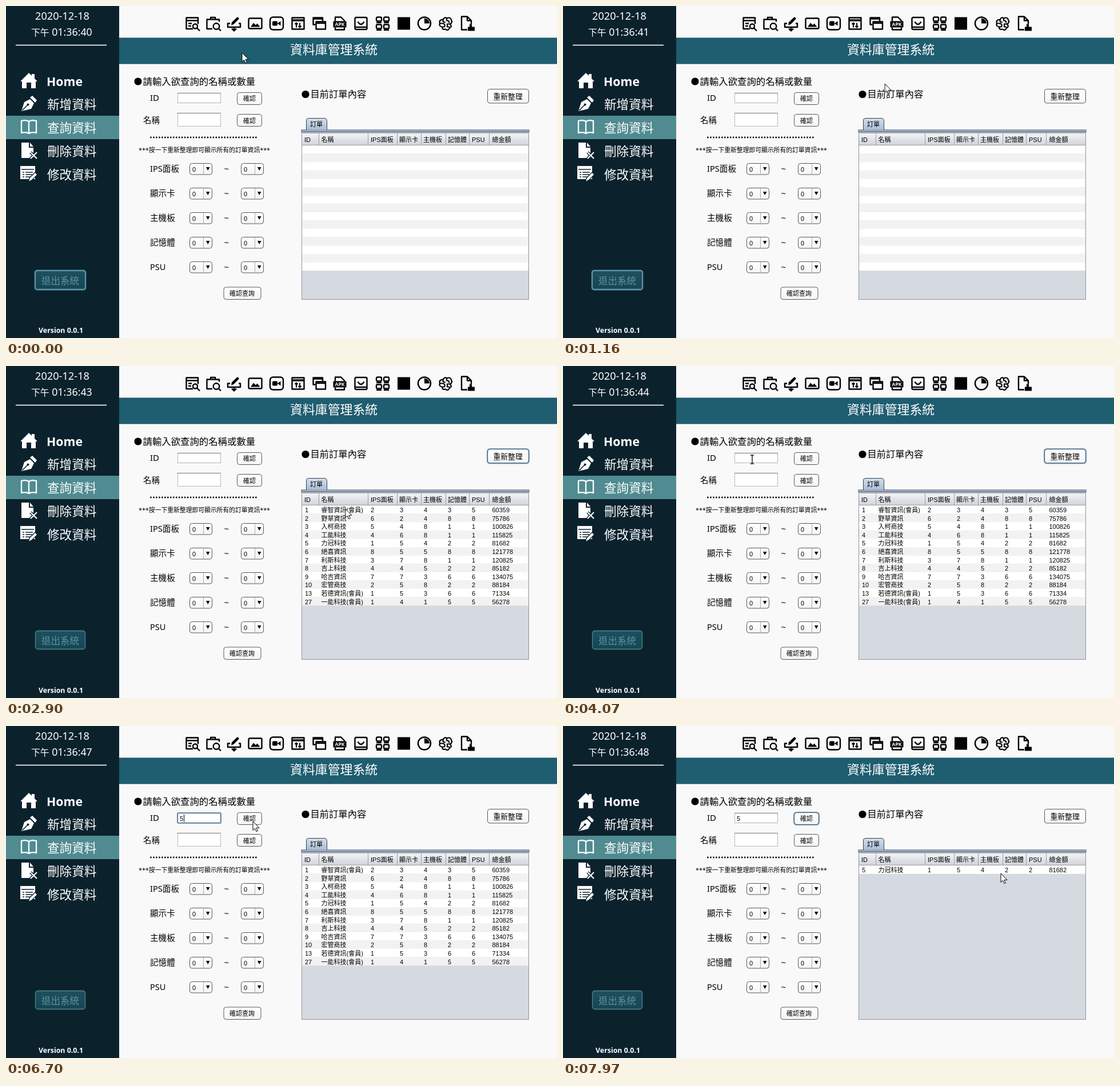
Write an HTML page that moves like this. It is 964 px wide and 581 px high and loops after 8 s.

```html
<!DOCTYPE html>
<html lang="zh-Hant">
<head>
<meta charset="utf-8">
<title>資料庫管理系統</title>
<style>
html, body { margin: 0; width: 100%; height: 100%; overflow: hidden; background: #f9f9f9; }
svg { display: block; width: 964px; height: 581px; }
text { font-family: "Noto Sans", "Noto Sans CJK TC", "Noto Sans CJK JP", sans-serif; font-weight: 500; white-space: pre; }
.ui text { font: 500 11px "Liberation Sans", "Noto Sans CJK TC", "Noto Sans CJK JP", sans-serif; }
.clock text { font-weight: 400; }
text.bold { font-weight: 700; }
.icon { fill: none; stroke: #000; stroke-width: 2.4; stroke-linejoin: round; }
.icon .solid { fill: #000; stroke: none; }
.digits { animation: tick 8s step-end infinite; }
.pointer { animation: move 8s linear infinite; }
.caret { animation: blink 1s step-end infinite; }
@keyframes blink { 0% { opacity: 0 } 50% { opacity: 1 } }
@keyframes tick {
  0% { transform: translateY(0) }
  5% { transform: translateY(-30px) }
  17.5% { transform: translateY(-60px) }
  30% { transform: translateY(-90px) }
  42.5% { transform: translateY(-120px) }
  55% { transform: translateY(-150px) }
  67.5% { transform: translateY(-180px) }
  80% { transform: translateY(-210px) }
  92.5% { transform: translateY(-240px) }
}
@keyframes move {
  0% { transform: translate(413px, 82px) }
  7.5% { transform: translate(413px, 82px); animation-timing-function: ease-in }
  14.5% { transform: translate(562px, 136px); animation-timing-function: ease-out }
  20.6%, 30% { transform: translate(888px, 160px) }
  30% { animation-timing-function: ease-in }
  36.25% { transform: translate(594px, 250px) }
  43.75% { transform: translate(420px, 195px); animation-timing-function: ease-out }
  48.5%, 74% { transform: translate(331px, 163.5px) }
  74% { animation-timing-function: ease-in-out }
  81%, 88.75% { transform: translate(432px, 167px) }
  88.75% { animation-timing-function: ease-in-out }
  98.5%, 100% { transform: translate(766px, 258px) }
}
</style>
</head>
<body>
<script>
const LOOP = 8000;
const rules = [];

const text = (x, y, str, size, attrs = '') =>
  `<text x="${x}" y="${y}" font-size="${size}" ${attrs}>${str}</text>`;
const small = (x, y, str) => `<text x="${x}" y="${y}">${str}</text>`;
const rect = (x, y, w, h, attrs = '') =>
  `<rect x="${x}" y="${y}" width="${w}" height="${h}" ${attrs}/>`;
const path = (d, attrs = '') => `<path d="${d}" ${attrs}/>`;
const circle = (x, y, r, attrs = '') => `<circle cx="${x}" cy="${y}" r="${r}" ${attrs}/>`;
const range = n => [...Array(n).keys()];

// Shows markup only between two times of the loop, in ms.
function during(from, to, markup) {
  const name = `show${rules.length}`;
  const frames = [[0, from > 0 ? 0 : 1], [from, 1], [to, 0]]
    .filter(([t], i) => i === 0 || (t > 0 && t < LOOP))
    .map(([t, o]) => `${t / LOOP * 100}% { opacity: ${o} }`);
  rules.push(`@keyframes ${name} { ${frames.join(' ')} }`);
  return `<g style="animation: ${name} ${LOOP}ms step-end infinite">${markup}</g>`;
}

const button = (x, y, w, h) =>
  rect(x + .5, y + .5, w, h, 'rx="4" fill="url(#face)" stroke="#54585e"');
const focusRing = (x, y, w, h, r = 5) =>
  rect(x - .3, y - .3, w + 1.6, h + 1.6, `rx="${r}" fill="none" stroke="#7fa6cb" stroke-width="1.6"`) +
  rect(x + .6, y + .6, w - .2, h - .2, `rx="${r - 1}" fill="none" stroke="#43586f" stroke-width=".9"`);

function sidebar() {
  const labels = ['新增資料', '查詢資料', '刪除資料', '修改資料'];
  const dark = '#0b222d';
  const icons = [
    path('M25 132L40 117L45 122V119H50V127L55 132H52V144H44V134H36V144H28V132Z'),
    path('M27 184L32 168L42 163L49 170L44 180ZM42 160L46 157L54 165L51 169Z') +
      path('M28 183L38 173', `stroke="${dark}" stroke-width="1.6"`) + circle(38.5, 172.5, 2, `fill="${dark}"`),
    path('M27 201Q35 199 40 202Q45 199 53 201V222Q45 220 40 223Q35 220 27 222ZM40 202V223',
      'fill="none" stroke="#fff" stroke-width="2.3"'),
    path('M27 239H40V248H48V266H27ZM42 239L48 246H42Z') +
      path('M43 256L54 267M54 256L43 267', `stroke="${dark}" stroke-width="5"`) +
      path('M43 256L54 267M54 256L43 267', 'stroke="#fff" stroke-width="2.2"'),
    path('M25 280H51V303H25Z') +
      path('M27 286H49M29 291H32M34 291H47M29 295H32M34 295H46M29 299H32M34 299H43', `stroke="${dark}" stroke-width="1.6"`) +
      path('M39 308L41 301L51 291L55 295L45 305Z', `stroke="${dark}" stroke-width="1.4"`),
  ];
  const exit = rect(51.5, 463.5, 87, 32, 'rx="4" fill="url(#exit)" stroke="#4b8792" stroke-width="1.3"') +
    during(0, 1800, rect(50.7, 462.7, 88.6, 34, 'rx="4" fill="none" stroke="#639ca8" stroke-width="1.8"')) +
    text(62, 486.5, '退出系統', 16.5, 'fill="#5b929d"');
  const seconds = range(9).map(i => text(140.6, 52 + i * 30, i, 17.8)).join('');
  return rect(0, 0, 198, 581, `fill="${dark}"`) + rect(0, 192, 198, 41, 'fill="#508b91"') +
    '<g fill="#fff"><g class="clock">' +
    text(51, 24, '2020-12-18', 18.2) + text(44, 51.5, '下午', 15.8) +
    text(140.6, 52, '01:36:4', 17.8, 'text-anchor="end"') +
    `<g clip-path="url(#clock)"><g class="digits">${seconds}</g></g></g>` +
    rect(17, 67.7, 159, 1.6) + icons.join('') +
    text(71, 140, 'Home', 21.3, 'class="bold"') +
    labels.map((s, i) => text(72, 179.5 + i * 41.2, s, 21.6)).join('') +
    text(57, 572, 'Version 0.0.1', 12.4, 'class="bold"') + '</g>' + exit;
}

function toolbar() {
  const solid = 'class="solid"';
  const icons = [
    [326, path('M13 21.5H1.5V2H22V13M1.5 7H22M5 12H11M5 16.5H10') + circle(17, 17, 4) + path('M20 20L25 25')],
    [363, path('M10 21.5H.5V5H22V9M7 5V1.5H15V5') + circle(17, 17, 5.3) + path('M21 21L25 25')],
    [399, path('M5 12H1V18.5H23V12H20M12 18V24M8 21L12 25L16 21') + path('M7 15L8 10L18 .5L21 3.5L11.5 13.5Z', solid)],
    [436, rect(.5, 3, 23, 18, 'rx="2"') + path('M4 18L9 11L13 15L15.5 12L20.5 18Z', solid)],
    [473, rect(1, 1, 23, 22, 'rx="5"') + rect(5, 8, 9, 8, 'rx="2" class="solid"') + path('M14 12L19.5 8V16Z', solid)],
    [511, rect(1.5, 2, 21, 20) + path('M1.5 6.5H22.5', 'stroke-width="3.5"') +
      path('M9 19V11M6.5 13.5L9 11L11.5 13.5M15 11V19M12.5 16.5L15 19L17.5 16.5', 'stroke-width="2"')],
    [548, path('M5 14H1.5V2H18V8M1.5 4H18') + rect(6.5, 9, 16.5, 13) + path('M6.5 11.5H23')],
    [584, path('M4 8V1H14L20 7V8M4 19V23H20V19') + rect(.5, 8, 23, 11, 'rx="1" class="solid"') +
      text(12, 16.8, 'APK', 8.5, 'class="bold" fill="#fff" stroke="none" text-anchor="middle"')],
    [621, rect(1.5, 1.5, 21, 21, 'rx="2"') + path('M1.5 18.5H22.5M6.5 9Q12 18 17.5 9')],
    [659, [[1, 1], [14, 1], [1, 14], [14, 14]].map(([x, y]) => rect(x, y, 9, 7, 'rx="2"') + path(`M${x} ${y + 9.5}H${x + 9}`)).join('')],
    [696, rect(1, 1, 22, 22, solid)],
    [732, circle(12, 12, 11) + path('M12 12V3A9 9 0 0 1 21 12Z', solid)],
    [769, path('M8 5Q10 0 14 3Q21 0 22 6Q25 10 20 13Q24 18 19 20Q16 26 12 22Q6 24 6 18Q0 17 2 12Q0 5 8 5ZM8 5Q6 10 12 10M14 3V7Q19 7 18 11M2 12H8Q12 14 10 18H6M20 13H15V18H19', 'stroke-width="2.2"')],
    [808, path('M11 23H1V0H11L18 7V13M11 0V7H18') + path('M15 13H19V18H24V25H12V18H15Z', solid)],
  ];
  return icons.map(([x, m]) => `<g class="icon" transform="translate(${x - 12} 18.5)">${m}</g>`).join('');
}

function form() {
  const labels = ['IPS面板', '顯示卡', '主機板', '記憶體', 'PSU'];
  const field = (y, h) => rect(300.5, y + .5, 75, h, 'fill="#fff" stroke="#b4b6ba"') +
    path(`M300 ${y + .5}H376`, 'stroke="#75787d"');
  const combo = (x, y) => button(x, y, 39, 19.5) + path(`M${x + 24.5} ${y + 1}V${y + 19}`, 'stroke="#a9adb3"') +
    path(`M${x + 29} ${y + 7}H${x + 35.5}L${x + 32.2} ${y + 13}Z`) + small(x + 5, y + 14.5, 0);
  const rows = labels.map((s, i) => {
    const y = 275 + i * 43;
    return text(252, y + 14.7, s, 14.6) + text(381.5, y + 15, '~', 15) +
      `<g class="ui">${combo(321, y)}${combo(411, y)}</g>`;
  });
  const caret = x => `<g class="caret">${rect(x, 155, 1, 13)}</g>`;
  return circle(231, 132, 6.6) + text(239.5, 138.3, '請輸入欲查詢的名稱或數量', 16.4) +
    text(252, 166, 'ID', 15) + text(240, 204.5, '名稱', 14.4) +
    path('M253.5 230H440', 'stroke="#000" stroke-width="2.8" stroke-linecap="round" stroke-dasharray="0 4.97"') +
    text(232, 256.3, '***按一下重新整理即可顯示所有的訂單資訊***', 10.8) + rows.join('') +
    '<g class="ui">' + field(152, 17) + field(187, 23) +
    during(4500, 6900, focusRing(300, 152, 75, 17, 2)) +
    during(4500, 5400, caret(304)) + during(5400, 6900, caret(311)) +
    during(5400, LOOP, small(304, 166, 5)) +
    button(404, 151, 43, 21) + button(404, 189, 43, 21) +
    during(6900, LOOP, focusRing(404, 151, 43, 21)) +
    small(415, 166.3, '確認') + small(415, 204.5, '確認') +
    button(380.5, 491.5, 65, 21.5) + small(391, 507.3, '確認查詢') + '</g>';
}

const orders = `1 睿智資訊(會員) 2 3 4 3 5 60359
2 野草資訊 6 2 4 8 8 75786
3 入柯商技 5 4 8 1 1 100826
4 工能科技 4 6 8 1 1 115825
5 力冠科技 1 5 4 2 2 81682
6 絕喜資訊 8 5 5 8 8 121778
7 利斯科技 3 7 8 1 1 120825
8 吉上科技 4 4 5 2 2 85182
9 哈吉資訊 7 7 3 6 6 134075
10 宏管商技 2 5 8 2 2 88184
13 若德資訊(會員) 1 5 3 6 6 71334
27 一能科技(會員) 1 4 1 5 5 56278`.split('\n').map(line => line.split(' '));

function orderTable() {
  const columns = [523, 551.5, 638, 689, 731, 773, 815, 850.5];
  const heads = ['ID', '名稱', 'IPS面板', '顯示卡', '主機板', '記憶體', 'PSU', '總金額'];
  const ROW = 14.6;
  const body = rows => rows.map((cells, i) => {
    const y = 244 + i * ROW;
    return rect(518, y, 396, ROW + .1, `fill="${i % 2 ? '#f2f2f2' : '#fff'}"`) +
      cells.map((c, k) => small(columns[k], Math.round(y + 12), c)).join('');
  }).join('');
  const splits = [547, 633, 684, 726, 769, 810, 845].map(x => `M${x}.5 223V243`).join('');
  return circle(524, 154.5, 6.6) + text(532.5, 160.3, '目前訂單內容', 16.3) +
    '<g class="ui">' + button(842, 145, 72, 24.5) +
    during(1800, 4500, focusRing(842, 145, 72, 24.5)) +
    text(852.5, 162.5, '重新整理', 12.8, 'style="font-size:12.8px"') +
    rect(516, 217, 400, 3.6, 'fill="#b6c5d9"') +
    path('M516 217H916M516 220.3H916', 'stroke="#354259" stroke-width="1.2"') +
    path('M525.5 217V200Q525.5 196.5 529 196.5H557Q561.5 196.5 561.5 201V217', 'fill="url(#tab)" stroke="#354259"') +
    small(532, 211, '訂單') +
    rect(517.5, 222.5, 397, 291, 'fill="#d5d9e0" stroke="#8e939b"') +
    rect(518, 223, 396, 21, 'fill="url(#head)"') +
    path(splits + 'M518 243.5H914', 'stroke="#9a9fa8"') +
    heads.map((s, k) => small(columns[k] - (k === 0 || (k > 2 && k < 5) ? 1 : 0), 237.7, s)).join('') +
    during(0, 1900, body(range(15).map(() => []))) +
    during(1900, 7000, body(orders)) +
    during(7000, LOOP, body([orders[4]])) + '</g>';
}

function pointer() {
  const arrow = path('M0 0V15.5L3.6 12.2L6 17.7L8.4 16.6L6 11.3H11Z', 'fill="#fff" stroke="#000"');
  const beam = path('M-3 -7.5H-1L0 -6.5L1 -7.5H3M0 -6.5V6.5M-3 7.5H-1L0 6.5L1 7.5H3', 'fill="none" stroke="#000" stroke-width="1.3"');
  return `<g class="pointer">${during(0, 3650, arrow)}${during(3650, 6200, beam)}${during(6200, LOOP, arrow)}</g>`;
}

const gradient = (id, top, bottom) => `<linearGradient id="${id}" x2="0" y2="1">
  <stop stop-color="${top}"/><stop offset="1" stop-color="${bottom}"/></linearGradient>`;

const scene = `<svg viewBox="0 0 964 581"><defs>
  ${gradient('face', '#fff', '#f3f4f5')}${gradient('exit', '#1d5060', '#174552')}
  ${gradient('tab', '#d5deea', '#a9bdd5')}${gradient('head', '#f3f4f6', '#cfd3da')}
  <clipPath id="clock">${rect(138, 34, 20, 24)}</clipPath></defs>` +
  rect(0, 0, 964, 581, 'fill="#f9f9f9"') +
  rect(190, 56, 780, 45, 'fill="#1f5d70" stroke="#1a4d5e"') +
  text(497, 84.3, '資料庫管理系統', 21.9, 'fill="#fff"') +
  sidebar() + toolbar() + form() + orderTable() + pointer() + '</svg>';

const sheet = document.createElement('style');
sheet.textContent = rules.join('\n');
document.head.append(sheet);
document.body.innerHTML = scene;
</script>
</body>
</html>
```
